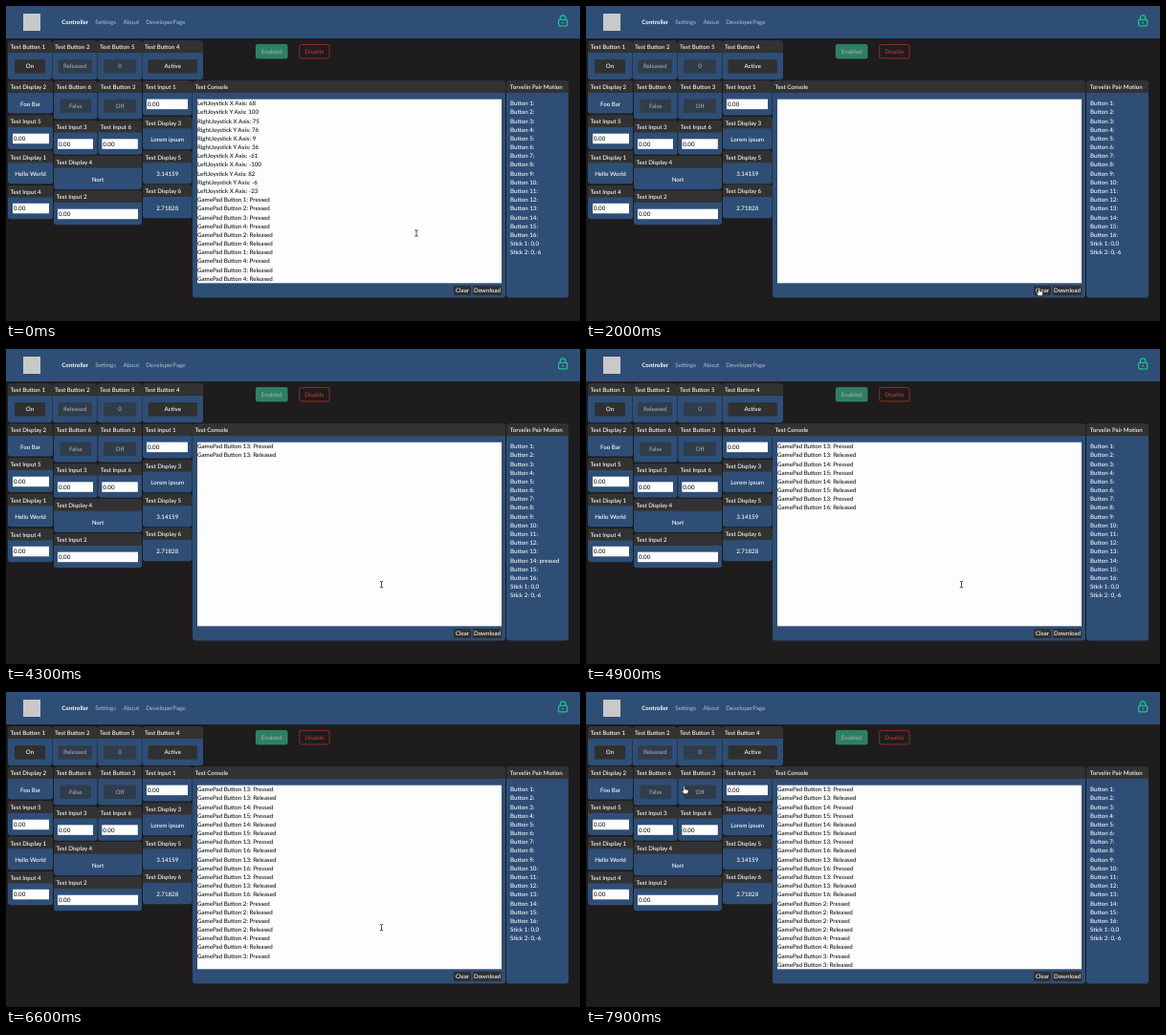
An HTML page that plays this animation: 600 px wide and 330 px high, repeating every 8 s.

```html
<!DOCTYPE html>
<html lang="en">
<head>
<meta charset="utf-8">
<title>Controller dashboard</title>
<style>
  html, body { margin: 0; width: 100%; height: 100%; overflow: hidden; background: #1e1c1d; }
  svg { display: block; width: 600px; height: 330px; }
  text {
    font: 500 6.2px Lato, "Open Sans", sans-serif;
    fill: #fff;
    text-rendering: geometricPrecision;
    white-space: pre;
  }
  .mid { text-anchor: middle; }
  .strong { font-weight: 700; }
  .link { fill: #b3becd; font-weight: 400; }
  .ink { fill: #111; }
  .off { fill: #a3abb6; }
  .blue { fill: #2e4e76; }
  .head { fill: #323232; }
  .white { fill: #fdfdfe; }
</style>
</head>
<body>
<svg id="stage" viewBox="0 0 600 330" xmlns="http://www.w3.org/2000/svg"></svg>
<script>
const LOOP = 8000, PITCH = 9.18, TOP = 102, CLEAR_AT = 1500, LAG = 100;
const stage = document.getElementById('stage');
const inputs = [], buttons = [];
let art = '';

// Text is placed by the vertical middle of its capitals.
const label = (x, y, s, cls = '') =>
  art += `<text x="${x}" y="${y + 2.2}" class="${cls}">${s}</text>`;

const box = (x, y, w, h, attrs, r = 0) =>
  art += `<rect x="${x}" y="${y}" width="${w}" height="${h}" rx="${r}" ${attrs}/>`;

function panel(x, y, w, h, title) {
  box(x, y, w, h, 'class="blue"', 3);
  art += `<path class="head" d="M${x} ${y + 12.5}v-9.5q0-3 3-3h${w - 6}q3 0 3 3v9.5z"/>`;
  label(x + 2.5, y + 6.5, title);
}

function button(x, y, w, h, s, off) {
  box(x, y, w, h, `fill="${off ? '#313c4a' : '#303030'}"`, 1.5);
  label(x + w / 2, y + h / 2, s, off ? 'mid off' : 'mid');
  buttons.push([x, y, w, h]);
}

function input(x, y, w, h = 10.5) {
  box(x, y, w, h, 'class="white"');
  label(x + 1, y + h / 2 + .2, '0.00', 'ink');
  inputs.push([x, y, w, h]);
}

// Navigation bar
box(0, 0, 600, 34, 'class="blue"');
box(18, 8, 18, 18, 'fill="#c9c9c9"');
label(58.3, 17, 'Controller', 'strong');
label(93.3, 17, 'Settings', 'link');
label(122.4, 17, 'About', 'link');
label(146.2, 17, 'DeveloperPage', 'link');
art += `<g fill="none" stroke="#1fc08f" stroke-width="1.3">
  <rect x="577.6" y="14.4" width="9" height="6.4" rx="1"/>
  <path d="M579.4 14.2v-1.6a2.7 2.7 0 0 1 5.4 0v1.6M582.1 16.6v2"/></g>`;

// Top row
panel(2, 36.5, 46, 40.5, 'Test Button 1');
panel(48.5, 36.5, 46.5, 40.5, 'Test Button 2');
panel(95.5, 36.5, 46.5, 40.5, 'Test Button 5');
panel(142.5, 36.5, 63.5, 40.5, 'Test Button 4');
button(9, 56, 32, 14.5, 'On');
button(54.5, 56, 35.5, 14.5, 'Released', true);
button(102, 56, 34, 14.5, '0', true);
button(148.5, 56, 51.5, 14.5, 'Active');

box(261.4, 40.4, 32.6, 14.4, 'fill="#2f7f62" stroke="#2b9a72" stroke-width=".8"', 1.5);
label(277.7, 47.7, 'Enabled', 'mid off');
box(306.8, 40.4, 31.2, 14.4, 'fill="none" stroke="#b22f29" stroke-width=".8"', 1.5);
art += '<text x="322.4" y="49.9" class="mid" style="fill:#c2362e">Disable</text>';

// Left column
panel(2, 78.5, 47, 34, 'Test Display 2');
label(25.5, 102.5, 'Foo Bar', 'mid');
panel(2, 114.5, 47, 35.5, 'Test Input 5');
input(7, 133.7, 38);
panel(2, 151.8, 47, 34.4, 'Test Display 1');
label(25.5, 175.7, 'Hello World', 'mid');
panel(2, 188, 47, 35.3, 'Test Input 4');
input(7, 206.8, 38);

// Middle columns
panel(50, 78.5, 45.5, 40, 'Test Button 6');
button(56.5, 97.5, 32.5, 14.5, 'False', true);
panel(96.3, 78.5, 45.7, 40, 'Test Button 3');
button(102, 97.5, 34, 14.5, 'Off', true);
panel(50, 120, 45.5, 35.7, 'Test Input 3');
input(54, 139.3, 37);
panel(96.3, 120, 45.7, 35.7, 'Test Input 6');
input(100.3, 139.3, 37.5);
panel(50, 157.2, 92, 34.8, 'Test Display 4');
label(96, 181.3, 'Nort', 'mid');
panel(50, 193.5, 92, 35.8, 'Test Input 2');
input(54, 212.7, 84);

// Right small column
panel(143, 78.5, 51.5, 36, 'Test Input 1');
input(147, 97.6, 43);
panel(143, 116, 51.5, 34.3, 'Test Display 3');
label(168.8, 139.8, 'Lorem ipsum', 'mid');
panel(143, 151.8, 51.5, 34.4, 'Test Display 5');
label(168.8, 175.7, '3.14159', 'mid');
panel(143, 187.6, 51.5, 34.6, 'Test Display 6');
label(168.8, 211.5, '2.71828', 'mid');

// Console and gamepad
panel(195, 78.5, 327, 227, 'Test Console');
box(200, 97.7, 318, 192.6, 'class="white"');
inputs.push([200, 97.7, 318, 192.6]);
button(468, 293, 18, 10, 'Clear');
button(488, 293, 30, 10, 'Download');
panel(523, 78.5, 65, 227, '');
label(526.8, 85, 'Torvelin Pair Motion');

art += '<g id="log">';
for (let i = 0; i < 21; i++) label(200, TOP + i * PITCH, '', 'ink');
art += '</g><g id="pad">';
for (let i = 0; i < 18; i++) label(527, TOP + i * PITCH, '');
art += `</g><g id="cursor">
  <path d="M-1.7-3.3Q0-3.3 0-2.3Q0-3.3 1.7-3.3M0-2.5V2.5M-1.7 3.3Q0 3.3 0 2.3Q0 3.3 1.7 3.3" fill="none" stroke="#222" stroke-width=".8"/>
  <path d="M-.8 0Q0-.9.8 0V2.9L3.9 3.6Q4.8 3.9 4.6 5L3.8 8H-.4L-2.7 4.8Q-2.5 3.7-1.5 4.5L-.8 5Z" fill="#fff" stroke="#111" stroke-width=".7"/>
  <path d="M0 0V6.6L1.6 5.2 2.6 7.5 3.6 7 2.6 4.8H4.7Z" fill="#111" stroke="#fff" stroke-width=".5"/>
</g>`;
stage.innerHTML = art;

const logRows = [...document.getElementById('log').children];
const padRows = [...document.getElementById('pad').children];
const cursor = document.getElementById('cursor');
const shapes = [...cursor.children];

const press = code => {
  const [, n, act] = code.match(/(\d+)([PR])/);
  return { n: +n, down: act === 'P', text: `GamePad Button ${n}: ${act === 'P' ? 'Pressed' : 'Released'}` };
};

const axes = 'LX68 LY100 RX75 RY76 RX9 RY36 LX-61 LX-100 LY82 RY-6 LX-23'.split(' ')
  .map(a => `${a[0] === 'L' ? 'Left' : 'Right'}Joystick ${a[1]} Axis: ${a.slice(2)}`);
const oldLog = axes.concat('1P 2P 3P 4P 2R 4R 1R 4P 3R 4R'.split(' ').map(c => press(c).text));

const events = ('3800:13P 4050:13R 4400:14P 4500:15P 4600:14R 4700:15R 4800:13P 4900:16R 5000:13R ' +
  '5100:16P 5200:13P 5400:13R 5500:16R 5700:2P 5850:2R 6000:2P 6100:2R 6300:4P 6450:4R 6600:3P 6700:3R')
  .split(' ').map(e => {
    const [at, code] = e.split(':');
    return { at: +at, ...press(code) };
  });

const path = [
  [0, 429, 238], [200, 429, 238], [900, 474.3, 296.3], [1950, 474.3, 296.3],
  [2600, 413, 263.5], [2900, 413, 263.5], [3500, 392.5, 246.7],
  [6900, 392.5, 246.7], [7800, 102.6, 98.8], [LOOP, 102.6, 98.8]
];

function position(t) {
  const i = path.findIndex(k => k[0] > t);
  const [t0, x0, y0] = path[i - 1], [t1, x1, y1] = path[i];
  const u = (t - t0) / (t1 - t0), e = u * u * (3 - 2 * u);
  return [x0 + (x1 - x0) * e, y0 + (y1 - y0) * e];
}

const within = (areas, px, py) =>
  areas.some(([x, y, w, h]) => px >= x && px <= x + w && py >= y && py <= y + h);

function write(el, s) {
  if (el.textContent !== s) el.textContent = s;
}

function draw(now) {
  const t = now % LOOP;
  const lines = t < CLEAR_AT ? oldLog : events.filter(e => e.at <= t).map(e => e.text);
  logRows.forEach((row, i) => write(row, lines[i] || ''));

  // The gamepad list reacts slightly ahead of the console.
  const held = new Set();
  for (const e of events) {
    if (e.at - LAG > t) break;
    if (e.down) held.add(e.n); else held.delete(e.n);
  }
  padRows.forEach((row, i) => write(row,
    i < 16 ? `Button ${i + 1}:${held.has(i + 1) ? ' pressed' : ''}`
           : i === 16 ? 'Stick 1: 0,0' : 'Stick 2: 0,-6'));

  const [x, y] = position(t);
  const shape = within(inputs, x, y) ? 0 : within(buttons, x, y) ? 1 : 2;
  shapes.forEach((s, i) => s.style.display = i === shape ? '' : 'none');
  cursor.setAttribute('transform', `translate(${x.toFixed(2)} ${y.toFixed(2)})`);
  requestAnimationFrame(draw);
}
draw(performance.now());
</script>
</body>
</html>
```
